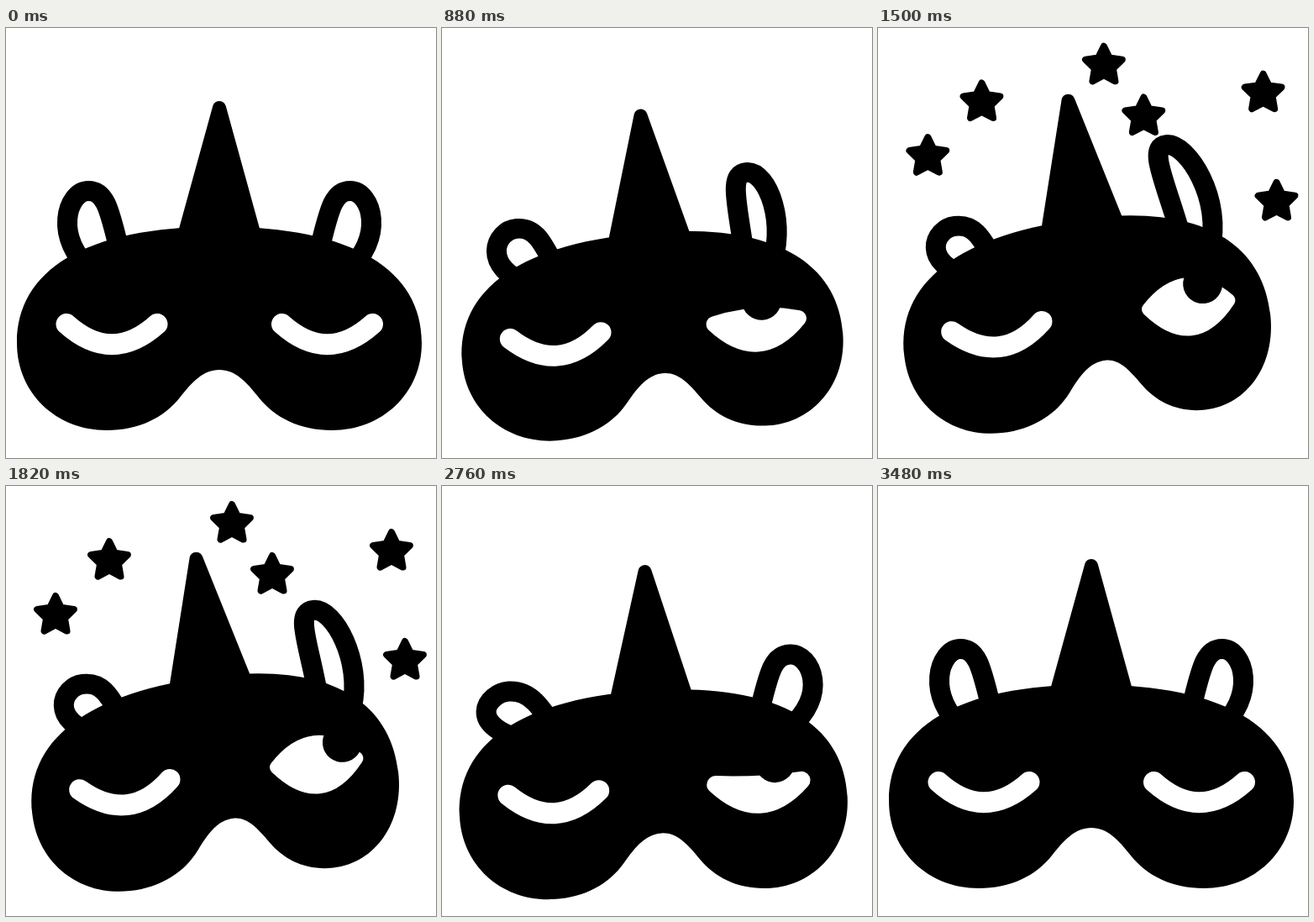
Recreate the animation shown at these times as an HTML page with a canvas. Size 512 px wide and 512 px high, loop 3.62 s.

```html
<!DOCTYPE html>
<html lang="en">
<head>
<meta charset="utf-8">
<title>Unicorn sleep mask</title>
<style>
html, body { margin: 0; width: 100%; height: 100%; overflow: hidden; background: #fff; }
canvas { display: block; width: 100vmin; height: 100vmin; }
</style>
</head>
<body>
<canvas id="stage" width="512" height="512"></canvas>
<script>
const ctx = document.getElementById('stage').getContext('2d');
const LOOP = 3620;
const INK = '#000', PAPER = '#fff';

// mid: centre of the mask; turn: 0 front, 1 turned; look: sideways glance
// Ears: tip relative to the base, and the width of the base
const ear = (x, y, base = 38) => ({ x, y, base });
const rest = {
  mid: { x: 254, y: 358 }, tall: 1, turn: 0, look: 0,
  left: ear(-25, -97), right: ear(-25, -97)
};
const dip = {
  ...rest, mid: { x: 253, y: 388.5 }, tall: 0.964,
  left: ear(-36, -84), right: ear(-36, -84)
};
const turned = {
  ...rest, mid: { x: 247.3, y: 349 }, turn: 1,
  left: ear(-31, -63), right: ear(29, -139, 22)
};
const glance = { ...turned, look: 1, right: ear(9.5, -114, 42) };
const land = {
  ...rest, mid: { x: 254, y: 378 },
  left: ear(-53, -61), right: ear(-58, -68)
};

const swing = u => (1 - Math.cos(Math.PI * u)) / 2;
const drift = u => swing(Math.pow(u, 0.75));

const moves = [
  [420, 560, rest, dip, swing],
  [560, 1110, dip, turned, swing],
  [1220, 2200, turned, glance, drift],
  [2480, 3010, glance, land, swing],
  [3020, 3480, land, rest, swing]
];

// Resting places of the stars, and where each passes at VIA
const stars = [
  [59, 154, 149, 35], [123, 89, 213, 32], [269, 45, 247, 30],
  [317, 106, 218, 43], [459, 78, 345, 44], [475, 208, 342, 45]
];
const FLY = 1120, VIA = 1220, FLY_END = 1520;
const shown = [[FLY, 2380], [2580, 2760]];

const lerp = (a, b, u) => a + (b - a) * u;
const clamp = v => Math.max(0, Math.min(1, v));

function mix(a, b, u) {
  if (typeof a === 'number') return lerp(a, b, u);
  const out = {};
  for (const k in a) out[k] = mix(a[k], b[k], u);
  return out;
}

function poseAt(t) {
  let pose = rest;
  for (const [start, end, from, to, ease] of moves) {
    if (t < start) break;
    pose = mix(from, to, ease(clamp((t - start) / (end - start))));
  }
  return pose;
}

// Turning narrows the mask and pushes its middle sideways
const place = (x, turn) => x * (1 - 0.09 * turn) + 18 * turn * (1 - Math.abs(x) / 241);

function shifted(dx, draw) {
  ctx.save();
  ctx.translate(dx, 0);
  draw();
  ctx.restore();
}

function body(turn) {
  const half = [
    [0, -121.5], [-161, -121.5], [-241, -69], [-241, 17],
    [-241, 77], [-194, 121], [-134, 121],
    [-96, 121], [-66, 106], [-47, 82], [-32, 63], [-19, 49], [0, 49]
  ];
  const mirrored = half.map(([x, y]) => [-x, y]).reverse();
  ctx.beginPath();
  ctx.moveTo(place(0, turn), half[0][1]);
  for (const side of [half, mirrored]) {
    const pts = side.map(([x, y]) => [place(x, turn), y]);
    for (let i = 1; i < pts.length; i += 3)
      ctx.bezierCurveTo(...pts[i], ...pts[i + 1], ...pts[i + 2]);
  }
  ctx.fill();
}

function horn() {
  ctx.lineWidth = 16;
  ctx.beginPath();
  ctx.moveTo(0, -263);
  ctx.lineTo(-40, -118);
  ctx.lineTo(40, -118);
  ctx.closePath();
  ctx.fill();
  ctx.stroke();
}

// The loop's bulge follows from where its tip leans
function drawEar({ x, y, base }, dir) {
  const bulge = -42 + 0.6 * x - 0.018 * x * x;
  ctx.scale(dir, 1);
  ctx.translate(0, -67);
  ctx.lineWidth = 24;
  ctx.beginPath();
  ctx.moveTo(-base / 2, 0);
  ctx.bezierCurveTo(bulge, y / 2 + 8, x - 25, y, x, y);
  ctx.bezierCurveTo(x + 25, y, 14 + x / 2, y / 2 - 14, base / 2, 0);
  ctx.stroke();
}

function eye(open) {
  const w = lerp(54, 48, open), y = -5.5;
  ctx.fillStyle = ctx.strokeStyle = PAPER;
  ctx.lineWidth = lerp(25, 16, open);
  ctx.beginPath();
  ctx.moveTo(-w, y);
  ctx.quadraticCurveTo(0, lerp(43, 52.5, open), w, y);
  ctx.quadraticCurveTo(0, lerp(43, -54.5, open), -w, y);
  ctx.closePath();
  ctx.fill();
  ctx.stroke();
  ctx.fillStyle = ctx.strokeStyle = INK;
}

function pupil(x, y) {
  ctx.beginPath();
  ctx.arc(x, y, 23.5, 0, Math.PI * 2);
  ctx.fill();
}

function mask({ mid, tall, turn, look, left, right }) {
  ctx.save();
  ctx.translate(mid.x, mid.y);
  ctx.rotate(-0.1134 * turn);
  ctx.scale(1, tall);
  body(turn);
  shifted(9 * turn, horn);
  shifted(place(-131, turn), () => drawEar(left, 1));
  shifted(place(131, turn) + 5 * turn + 28 * look, () => drawEar(right, -1));
  shifted(place(-128, turn) + 2 * turn, () => eye(0));
  shifted(place(128.5, turn) - 1.5 * turn, () => eye(turn));
  pupil(133.5 + 30 * look, -30 + 5 * look);
  ctx.restore();
}

function star(x, y, size) {
  ctx.save();
  ctx.translate(x, y);
  ctx.scale(size, size);
  ctx.lineWidth = 8;
  ctx.beginPath();
  for (let i = 0; i < 10; i++) {
    const r = i % 2 ? 11.5 : 23, a = i * Math.PI / 5;
    ctx.lineTo(r * Math.sin(a), -r * Math.cos(a));
  }
  ctx.closePath();
  ctx.fill();
  ctx.stroke();
  ctx.restore();
}

function burst(t) {
  if (!shown.some(([a, b]) => t >= a && t < b)) return;
  const travel = time => 1 - (1 - clamp((time - FLY) / (FLY_END - FLY))) ** 2;
  const u = travel(t), via = travel(VIA);
  // Quadratic arc from the horn tip through the passing point
  const arc = (from, pass, to) => {
    const bend = (pass - (1 - via) ** 2 * from - via ** 2 * to) / (2 * via * (1 - via));
    return (1 - u) ** 2 * from + 2 * u * (1 - u) * bend + u * u * to;
  };
  for (const [x, y, px, py] of stars)
    star(arc(227, px, x), arc(90, py, y), clamp((t - FLY) / 80));
}

function draw(t) {
  ctx.fillStyle = PAPER;
  ctx.fillRect(0, 0, 512, 512);
  ctx.fillStyle = ctx.strokeStyle = INK;
  ctx.lineCap = ctx.lineJoin = 'round';
  mask(poseAt(t));
  burst(t);
}

const begin = performance.now();
function tick() {
  draw((performance.now() - begin) % LOOP);
  requestAnimationFrame(tick);
}
tick();
</script>
</body>
</html>
```
